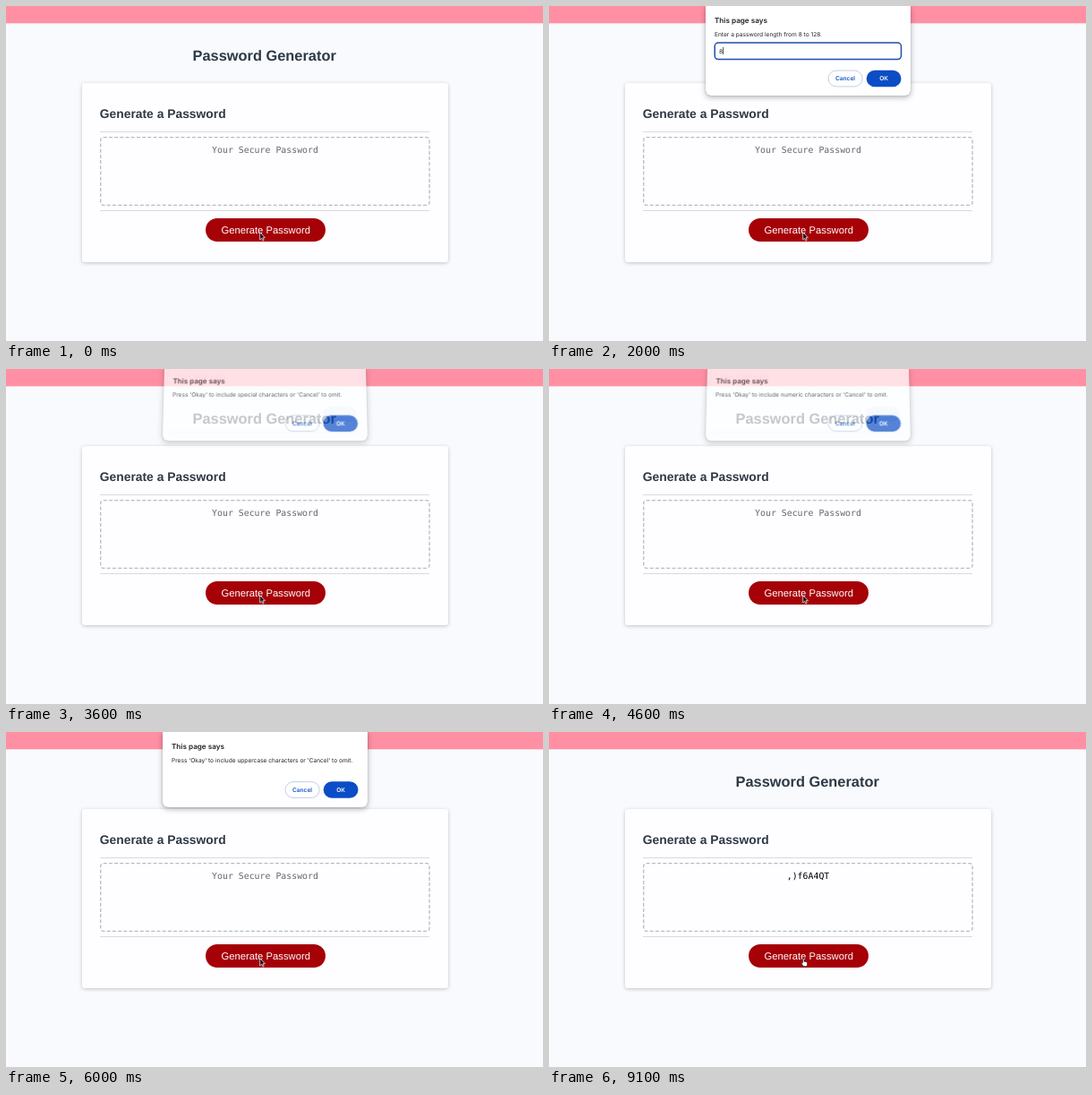
These frames come from a looping animation (600 px wide and 374 px high, 9.8 s). An HTML page:

```html
<!DOCTYPE html>
<html lang="en">
<head>
<meta charset="utf-8">
<title>Password Generator</title>
<style>
  html, body { margin: 0; width: 100%; height: 100%; overflow: hidden; background: #f8fafd; }
  #stage { position: relative; width: 600px; height: 374px; overflow: hidden; }
  svg { position: absolute; left: 0; top: 0; overflow: visible; }
  text { text-rendering: geometricPrecision; }
  .card {
    position: absolute; left: 85px; top: 86px; width: 409px; height: 200px;
    background: #fefdff; border-radius: 3px; box-shadow: 0 1px 4px rgba(0, 0, 0, .22);
  }
  .head { font-family: "Liberation Sans", Arial, sans-serif; font-weight: 700; fill: #2d3946; }
  .mono { font-family: "DejaVu Sans Mono", monospace; font-size: 9.9px; text-anchor: middle; }
  .rule { stroke: #d9dade; }
  .action { font: 11.25px "Liberation Sans", Arial, sans-serif; fill: #fff; text-anchor: middle; }
  .dialog {
    position: absolute; left: 175px; top: 0; width: 229px; height: 83.5px;
    background: #fff; border-radius: 0 0 6px 6px; transform-origin: 50% 100%;
    box-shadow: 0 0 1px rgba(0, 0, 0, .4), 0 2px 6px rgba(0, 0, 0, .3);
    font-family: Inter, sans-serif; visibility: hidden;
  }
  .dialog.prompt { height: 100px; }
  .title { font-size: 8.15px; font-weight: 600; fill: #202226; }
  .body { font-size: 6.6px; fill: #202226; }
  .key { font-size: 6.6px; font-weight: 600; text-anchor: middle; }
</style>
</head>
<body>
<div id="stage">
  <div class="card"></div>
  <svg width="600" height="374">
    <rect width="600" height="19.3" fill="#ff8fa2"/>
    <text class="head" x="208.5" y="61" font-size="16.4">Password Generator</text>
    <text class="head" x="104.8" y="125.4" font-size="13.85">Generate a Password</text>
    <path class="rule" d="M105 140.5H473M105 228.5H473"/>
    <rect x="105.7" y="146.7" width="367.4" height="75.6" rx="3" fill="none"
          stroke="#b3bec5" stroke-width="1.3" stroke-dasharray="4 2.2"/>
    <text class="mono" id="output" x="289.5" y="164"></text>
    <rect x="223" y="237" width="134" height="26" rx="13" fill="#a50107"/>
    <text class="action" x="290.2" y="253.6">Generate Password</text>
    <path id="arrow" d="M283.7 252.6v8.3l1.9-1.7 1.3 2.9 1.3-.6-1.3-2.8h2.5z"
          fill="#111" stroke="#fff" stroke-width=".7"/>
    <path id="hand" d="M283.4 253.4q.9-1 1.6 0v3q.9-.5 1.3.1.8-.4 1.2.3.9-.2 1.1.6v2.1q-.2 1.2-.8 2.2h-3.5q-1.3-1.8-2.4-3.8 0-1 1.5 0z"
          fill="#fff" stroke="#222" stroke-width=".7"/>
  </svg>
</div>
<script>
  const LOOP = 9800, STEP = 100;
  const OPEN_MS = 280, CLOSE_MS = 210;
  const TYPED = 700, BLINK = 500, DONE = 6700, HOVER = 7000;
  const stage = document.getElementById('stage');
  const byId = id => document.getElementById(id);

  const ask = kind => `Press 'Okay' to include ${kind} characters or 'Cancel' to omit.`;
  const dialogs = [
    { message: 'Enter a password length from 8 to 128.', open: 90, close: 2000, prompt: true },
    { message: ask('special'), open: 2090, close: 3500 },
    { message: ask('numeric'), open: 3590, close: 4500 },
    { message: ask('lowercase'), open: 4590, close: 5500 },
    { message: ask('uppercase'), open: 5590, close: DONE }
  ];

  const field = `
    <rect x="10.2" y="41" width="208.3" height="18.6" rx="4" fill="#fff" stroke="#1a4fae" stroke-width="1.5"/>
    <text class="body" id="typed" x="15" y="52.5"></text>
    <rect id="caret" y="46" width=".8" height="8" fill="#222"/>`;

  function build(d) {
    const y = d.prompt ? 71.7 : 55.2;
    d.el = document.createElement('div');
    d.el.className = d.prompt ? 'dialog prompt' : 'dialog';
    d.el.innerHTML = `<svg width="229" height="100">
      <text class="title" x="10" y="19.2">This page says</text>
      <text class="body" x="10" y="34.4">${d.message}</text>
      ${d.prompt ? field : ''}
      <rect x="137" y="${y + .4}" width="38.2" height="17.8" rx="8.9" fill="#fff" stroke="#b9cae0" stroke-width=".9"/>
      <text class="key" x="156" y="${y + 11.7}" fill="#1455c4">Cancel</text>
      <rect x="179.7" y="${y}" width="38.8" height="18.5" rx="9.25" fill="#0b4dc6"/>
      <text class="key" x="199" y="${y + 11.7}" fill="#fff">OK</text>
    </svg>`;
    stage.append(d.el);
  }

  // 0 when the dialog is fully shown, 1 when it is gone
  function retreat(d, t) {
    if (t < d.open || t >= d.close + CLOSE_MS) return 1;
    if (t >= d.close) return ((t - d.close) / CLOSE_MS) ** 2;
    return Math.max(0, 1 - (t - d.open) / OPEN_MS) ** 2;
  }

  function pose(d, t) {
    const q = retreat(d, t), s = d.el.style;
    s.visibility = q < 1 ? 'visible' : 'hidden';
    s.opacity = (1 - q) ** 1.3;
    s.transform = q
      ? `translateY(${-17 * q}px) perspective(400px) rotateX(${22 * q}deg)`
      : 'none';
  }

  function draw(now) {
    const t = Math.floor(now % LOOP / STEP) * STEP;
    dialogs.forEach(d => pose(d, t));

    const typed = t >= TYPED;
    const lit = !typed || Math.floor((t - TYPED) / BLINK) % 2 === 0;
    byId('typed').textContent = typed ? '8' : '';
    byId('caret').setAttribute('x', typed ? 19.3 : 15);
    byId('caret').style.opacity = lit ? 1 : 0;

    const done = t >= DONE;
    byId('output').textContent = done ? ',)f6A4QT' : 'Your Secure Password';
    byId('output').style.fill = done ? '#000' : '#65666b';
    byId('arrow').style.display = t < HOVER ? '' : 'none';
    byId('hand').style.display = t < HOVER ? 'none' : '';
  }

  dialogs.forEach(build);
  const start = performance.now();
  function frame() {
    draw(performance.now() - start);
    requestAnimationFrame(frame);
  }
  frame();
</script>
</body>
</html>
```
